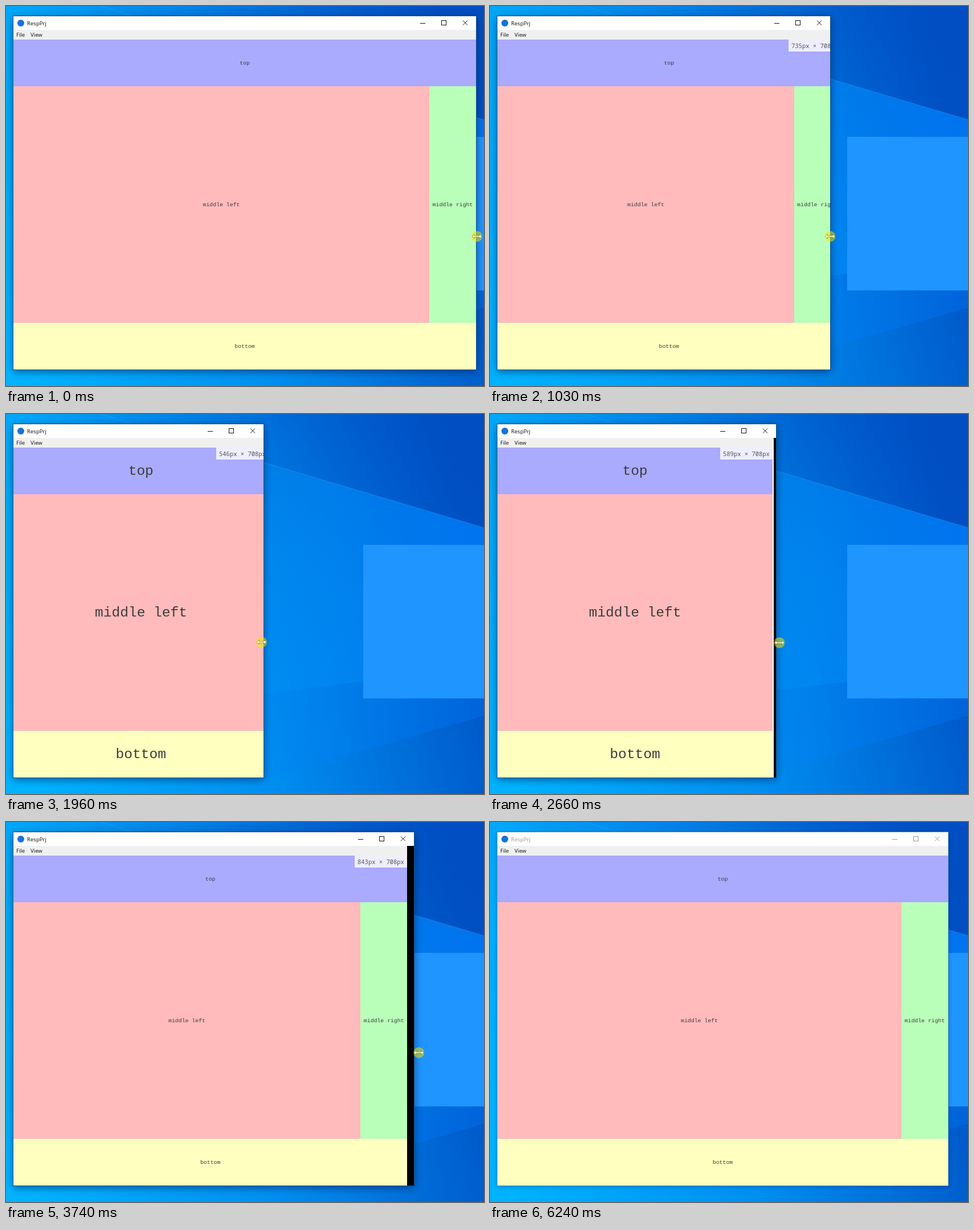
Recreate the animation shown at these times as an HTML page with a canvas. Size 839x668 px, loop 6300 ms.

```html
<!DOCTYPE html>
<html lang="en">
<head>
<meta charset="utf-8">
<title>Responsive layout</title>
<style>
html, body { margin: 0; width: 839px; height: 668px; overflow: hidden; background: #0086ec; }
canvas { display: block; }
</style>
</head>
<body>
<canvas id="stage" width="839" height="668"></canvas>
<script>
const c = document.getElementById('stage').getContext('2d');
const LOOP = 6300, LEFT = 13, TOP = 18, BOTTOM = 639, SCALE = 0.8197;
const UI = '9.6px "Open Sans", "Noto Sans", sans-serif';

// step, content right edge, window right edge, pointer x, pointer y
const SHRINK = [
  [-1, 825, 825, 826.5, 405], [8, 668, 660, 665, 405], [11, 615.5, 597, 597, 405],
  [17, 515, 508, 510, 403], [23, 460.5, 452, 448.5, 401], [25, 439, 439, 436, 401]
];
const GROW = [
  [-1, 439, 439, 436, 401], [4, 496, 502, 508, 402], [8, 535, 549, 556, 402],
  [13, 609, 623, 632, 403], [17, 690, 703, 713, 405], [25, 804, 804, 806, 408]
];

function sample(keys, step) {
  const i = Math.max(1, keys.findIndex(k => k[0] >= step));
  const a = keys[i - 1], b = keys[i], f = (step - a[0]) / (b[0] - a[0]);
  return a.map((v, n) => v + (b[n] - v) * f).slice(1);
}

function pose(t) {
  const growing = t >= 2340;
  const step = Math.floor((t - (growing ? 2340 : 180) + 10) / 77.4);
  const p = sample(growing ? GROW : SHRINK, Math.min(25, Math.max(-1, t < 180 ? -1 : step)));
  if (t >= 4680) {
    const n = Math.min(5, Math.floor((t - 4680) / 75) + 1);
    p[2] -= 2.6 * n;
    p[3] += 55 * n;
  }
  return p;
}

function rect(x, y, right, bottom, fill) {
  c.fillStyle = fill;
  c.fillRect(x, y, right - x, bottom - y);
}

function poly(points, fill) {
  c.beginPath();
  points.forEach(([x, y]) => c.lineTo(x, y));
  c.closePath();
  c.fillStyle = fill;
  c.fill();
}

function line(points, stroke, width = 1) {
  c.beginPath();
  points.forEach(([x, y]) => c.lineTo(x, y));
  c.strokeStyle = stroke;
  c.lineWidth = width;
  c.stroke();
}

function text(s, x, y, font, fill, align = 'left') {
  c.font = font;
  c.fillStyle = fill;
  c.textAlign = align;
  c.fillText(s, x, y);
}

function ramp(x0, y0, x1, y1, ...colors) {
  const g = c.createLinearGradient(x0, y0, x1, y1);
  colors.forEach((col, i) => g.addColorStop(i / (colors.length - 1), col));
  return g;
}

function wallpaper() {
  rect(0, 0, 839, 668, ramp(0, 500, 839, 300, '#00b2ff', '#008df0', '#0052c4'));
  rect(0, 0, 839, 300, ramp(500, 260, 640, 0, 'rgba(0,70,190,0)', 'rgba(0,70,190,.35)'));
  poly([[165, 0], [839, 200], [839, 530], [450, 643], [0, 668], [0, 0]],
    ramp(300, 0, 839, 0, 'rgba(0,150,255,0)', 'rgba(0,146,255,.5)', 'rgba(0,128,255,.75)'));
  poly([[400, 499], [627, 470], [839, 500], [839, 530], [450, 643]],
    ramp(450, 0, 839, 0, 'rgba(0,110,220,.1)', 'rgba(0,84,200,.55)'));
  line([[165, 0], [839, 200]], 'rgba(50,170,255,.45)');
  rect(627, 230, 897, 500, '#1f95ff');
}

function frame(right, active) {
  c.save();
  c.shadowColor = active ? 'rgba(0,20,60,.6)' : 'rgba(0,20,60,.35)';
  c.shadowBlur = active ? 14 : 8;
  c.shadowOffsetY = active ? 3 : 1;
  rect(LEFT, TOP, right, BOTTOM, '#fff');
  c.restore();
  c.strokeStyle = active ? '#15528c' : '#4a8cc4';
  c.lineWidth = 1;
  c.strokeRect(LEFT - .5, TOP - .5, right - LEFT + 1, BOTTOM - TOP + 1);

  const ink = active ? '#111' : '#999';
  c.beginPath();
  c.arc(26, 30, 6, 0, 7);
  c.fillStyle = '#1673d8';
  c.fill();
  text('RespPrj', 37, 33.5, UI, ink);
  line([[right - 98, 30.5], [right - 89, 30.5]], ink);
  c.strokeRect(right - 60.5, 25.5, 8, 8);
  for (const d of [-4, 4]) line([[right - 19 - d, 25.5], [right - 19 + d, 33.5]], ink);
}

function caption(s, x, y, size) {
  text(s, x, y + size * .3, `${size}px "Liberation Mono", monospace`, '#3c3c3c', 'center');
}

function content(edge, right, label) {
  const px = Math.round((edge - LEFT) / SCALE), narrow = px < 640;
  const end = Math.round(edge), split = narrow ? end : end - 82;
  const size = (narrow ? 30 : 12) * SCALE, mid = (LEFT + edge) / 2;
  const gap = end + (narrow ? 2 : 0);

  c.save();
  c.beginPath();
  c.rect(LEFT, 42, right - LEFT, BOTTOM - 42);
  c.clip();
  rect(LEFT, 42, gap, 59, '#f0f0f0');
  if (right > gap) rect(gap, 42, right, BOTTOM, '#000');
  text('File', 18, 54, UI, '#111');
  text('View', 43, 54, UI, '#111');

  rect(LEFT, 59, end, 141, '#aaf');
  rect(LEFT, 141, split, 557, '#fbb');
  rect(split, 141, end, 557, '#b9ffb9');
  rect(LEFT, 557, end, BOTTOM, '#ffffc0');
  caption('top', mid, 100, size);
  caption('middle left', (LEFT + split) / 2, 349, size);
  if (!narrow) caption('middle right', edge - 41, 349, size);
  caption('bottom', mid, 598, size);

  if (label) {
    rect(end - 92, 59, end, 80, 'rgba(255,255,255,.8)');
    text(`${px}px × 708px`, end - 87, 74, '10.5px "Noto Sans Mono", monospace', '#555');
  }
  c.restore();
}

function pointer(x, y) {
  c.beginPath();
  c.arc(x, y, 9.5, 0, 7);
  c.fillStyle = 'rgba(245,228,0,.52)';
  c.fill();
  const half = [[-8.5, 0], [-4.5, -4], [-4.5, -1.2], [4.5, -1.2], [4.5, -4]];
  const points = [...half, ...half.map(([a, b]) => [-a, -b])].map(([a, b]) => [x + a, y + b]);
  poly(points, '#ffffc8');
  c.strokeStyle = 'rgba(95,85,0,.75)';
  c.lineWidth = .7;
  c.stroke();
}

function draw(now) {
  const t = now % LOOP, [edge, win, x, y] = pose(t), right = Math.round(win);
  wallpaper();
  frame(right, t < 6240);
  content(edge, right, t >= 180 && t < 5300);
  pointer(x, y);
}

const start = performance.now();
function tick() {
  draw(performance.now() - start);
  requestAnimationFrame(tick);
}
tick();
</script>
</body>
</html>
```
